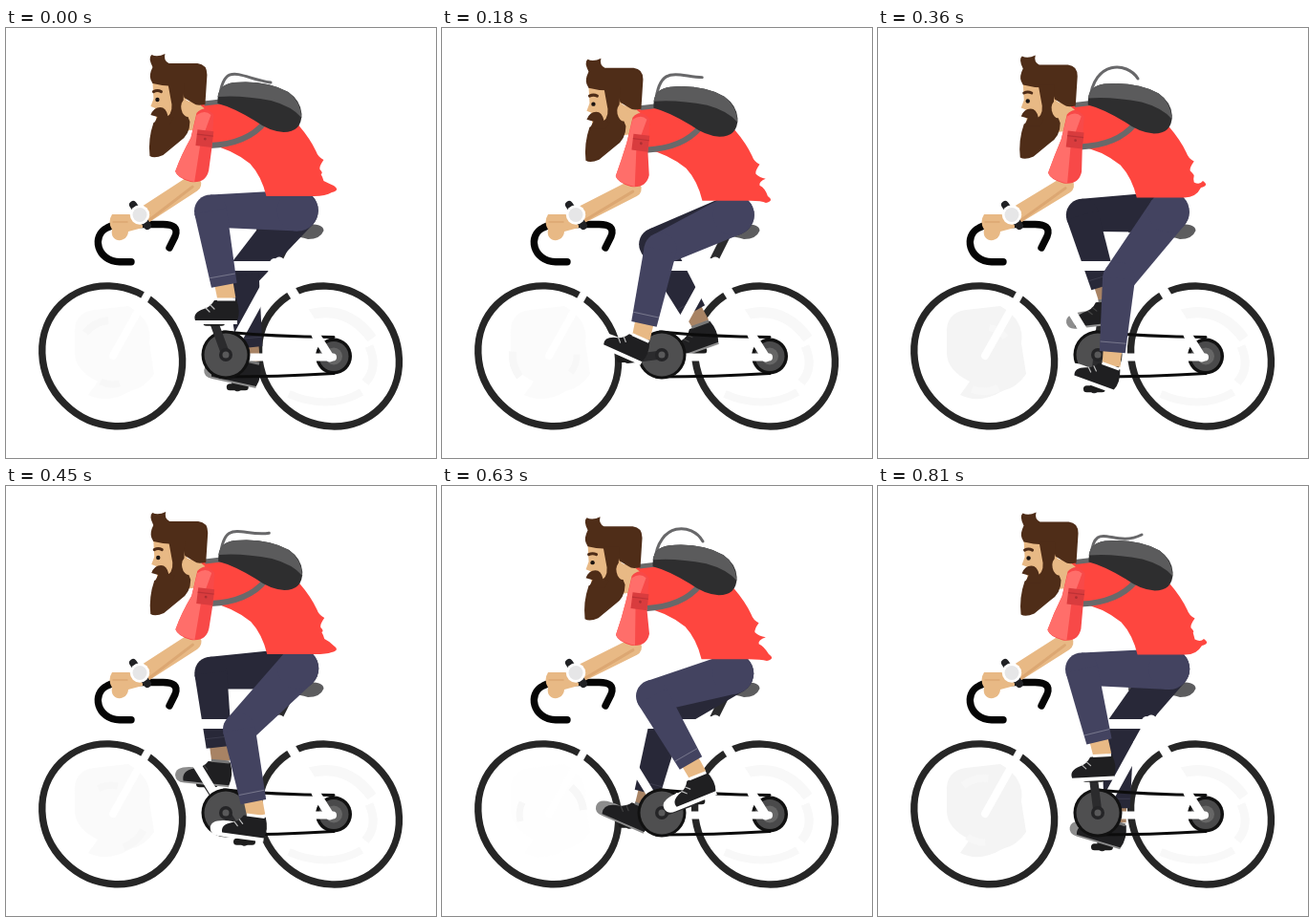
An HTML page with a canvas for the animation above (0.84 s loop, 450 by 450 pixels).

```html
<!DOCTYPE html>
<html lang="en">
<head>
<meta charset="utf-8">
<title>Cyclist</title>
<style>
html, body { margin: 0; width: 100%; height: 100%; overflow: hidden; background: #fff; }
canvas { display: block; width: 450px; height: 450px; }
</style>
</head>
<body>
<canvas id="stage" width="450" height="450"></canvas>
<script>
const ctx = document.getElementById('stage').getContext('2d');
const LOOP = 840, STEP = 30, TAU = Math.PI * 2;
const SKIN = '#e8b985', BROWN = '#4f2d18', RED = '#fe463f', WHITE = '#fff';
const HUB = [230, 342], AXLE = [343, 343.5];

// time, knee x y, ankle x y, foot angle in degrees
const LEG = [
  [0, 214, 191.5, 231, 284, 0],
  [120, 217, 212, 208, 304, 22],
  [240, 241, 250, 215, 344, 23],
  [360, 252, 262, 244, 354, 20],
  [510, 236, 246, 270, 335, -2],
  [630, 220, 220, 268, 303, -22],
  [810, 213, 191.5, 235, 282, -3]
];
// time, shirt tail x y, strap tip x y, strap bend y, wheel haze
const CLOTH = [
  [0, 347, 169, 277, 57, 53, .4],
  [120, 349, 177, 271, 52, 34, .08],
  [240, 341, 180, 274, 52, 66, .8],
  [360, 344, 164, 272, 53, 35, 1],
  [510, 348, 177, 277, 48, 64, .05],
  [630, 346, 180, 273, 58, 38, .12],
  [810, 345, 164, 276, 51, 66, 1]
];

// smooth periodic curve through the rows of a table
function sample(rows, t) {
  t = ((t % LOOP) + LOOP) % LOOP;
  const n = rows.length;
  const at = k => rows[(k + n) % n];
  const time = k => at(k)[0] + Math.floor(k / n) * LOOP;
  let i = n - 1;
  while (rows[i][0] > t) i--;
  const [ta, tb, tc, td] = [-1, 0, 1, 2].map(k => time(i + k));
  const span = tc - tb, u = (t - tb) / span;
  return at(i).slice(1).map((b, j) => {
    const a = at(i - 1)[j + 1], c = at(i + 1)[j + 1], d = at(i + 2)[j + 1];
    const m = (c - a) / (tc - ta) * span, k = (d - b) / (td - tb) * span;
    return b + u * (m + u * (3 * (c - b) - 2 * m - k + u * (2 * (b - c) + m + k)));
  });
}

function shape(d, color) {
  ctx.fillStyle = color;
  ctx.fill(new Path2D(d));
}
function line(d, color, width, cap = 'round') {
  ctx.strokeStyle = color;
  ctx.lineWidth = width;
  ctx.lineCap = cap;
  ctx.lineJoin = 'round';
  ctx.stroke(new Path2D(d));
}
function disc(x, y, r, color) {
  ctx.fillStyle = color;
  ctx.beginPath();
  ctx.arc(x, y, r, 0, TAU);
  ctx.fill();
}
function within(x, y, angle, draw) {
  ctx.save();
  ctx.translate(x, y);
  ctx.rotate(angle);
  draw();
  ctx.restore();
}
// tapered band from a to b, half widths ra and rb
function limb(a, ra, b, rb, color) {
  const dx = b[0] - a[0], dy = b[1] - a[1], len = Math.hypot(dx, dy);
  const nx = -dy / len, ny = dx / len;
  ctx.fillStyle = color;
  ctx.beginPath();
  ctx.moveTo(a[0] + nx * ra, a[1] + ny * ra);
  ctx.lineTo(b[0] + nx * rb, b[1] + ny * rb);
  ctx.lineTo(b[0] - nx * rb, b[1] - ny * rb);
  ctx.lineTo(a[0] - nx * ra, a[1] - ny * ra);
  ctx.fill();
}
const mix = (a, b, u) => [a[0] + (b[0] - a[0]) * u, a[1] + (b[1] - a[1]) * u];

function drawHaze(amount, t) {
  ctx.globalAlpha = amount;
  shape('M72 322Q70 298 92 295L128 291Q154 306 150 330L155 362Q146 376 130 380Q106 394 86 384L96 370Q72 358 72 340Z', '#f4f4f4');
  ctx.globalAlpha = 1;
  within(111, 343, -t / LOOP * TAU, () => {
    line('M-28 -24A37 37 0 0 1 -4 -37', '#f7f7f7', 8, 'butt');
    line('M8 29A30 30 0 0 1 -12 27', '#f7f7f7', 7, 'butt');
  });
  within(338, 343, 0, () => {
    line('M-24 -42Q18 -55 45 -18', '#f8f8f8', 11, 'butt');
    line('M-42 40Q0 58 34 38', '#f8f8f8', 8, 'butt');
    line('M42 -10Q52 12 38 28', '#f8f8f8', 9, 'butt');
  });
}

// the wheels lean into a slight diagonal oval
function drawWheel(x, y) {
  ctx.strokeStyle = '#262626';
  ctx.lineWidth = 7.4;
  ctx.beginPath();
  ctx.ellipse(x, y, 76.2, 70.6, TAU / 8, 0, TAU);
  ctx.stroke();
}

function drawCrank(angle, color) {
  const x = HUB[0] - 36 * Math.sin(angle), y = HUB[1] - 36 * Math.cos(angle);
  line(`M${HUB}L${x} ${y}`, color, 9);
  line(`M${x - 8} ${y}h16`, '#1c1c1c', 7);
}

function drawLeg(t, hip, far) {
  const [kx, ky, ax, ay, deg] = sample(LEG, t);
  const knee = [kx, ky], ankle = [ax, ay];
  const cloth = far ? '#282838' : '#434360';
  const len = Math.hypot(ax - kx, ay - ky);
  const hem = mix(knee, ankle, 1 - 15 / len);
  limb(mix(knee, ankle, .7), 10, ankle, 9.5, far ? '#a88364' : SKIN);
  within(ax, ay, deg * Math.PI / 180, () => {
    shape('M-22 9Q-47 8 -46 19Q-45 26 -36 26H11V20Z', far ? '#8d8d8d' : WHITE);
    shape(far
      ? 'M-13 1L10 0Q15 13 11 24H-37Q-40 14 -27 10Q-17 8 -13 1Z'
      : 'M-13 1L10 0Q15 13 11 22H-33Q-36 14 -24 10Q-17 8 -13 1Z', '#1f1f21');
    line('M-22 9l4 4M-17 6l4 4', far ? '#444' : '#bbb', 1.2);
    line('M-10 0H9', far ? '#777' : WHITE, 3, 'butt');
  });
  limb(hip, 21.5, knee, 17, cloth);
  disc(hip[0], hip[1], 21.5, cloth);
  disc(kx, ky, 17, cloth);
  limb(knee, 17, hem, 13.5, cloth);
  const cuff = mix(knee, ankle, 1 - 25 / len);
  within(cuff[0], cuff[1], Math.atan2(ay - ky, ax - kx) - Math.PI / 2,
    () => line('M-13.5 0H13.5', far ? '#3b3b4c' : '#77778c', 1, 'butt'));
}

function drawSeat() {
  line('M299 214L284 244', '#2b2b2d', 9, 'butt');
  shape('M262 209Q290 210 308 206Q332 203 332.5 212Q329 221 316 221Q300 216 262 214Z', '#5c5c5e');
}

function drawFrame() {
  line('M172 236L112 343', WHITE, 8);
  line('M168 249H284', WHITE, 10);
  line('M174 250L228 338', WHITE, 9);
  line('M286 245L236 336', WHITE, 11);
  line('M281 246L338 338', WHITE, 10);
}

function drawChain() {
  disc(...AXLE, 19, '#111');
  disc(...AXLE, 15.5, '#4a4a4b');
  disc(...AXLE, 9, '#666');
  line('M228 318Q280 323 343 323.5', '#0c0c0c', 3);
  line('M224 365Q285 365 343 361.5', '#0c0c0c', 3);
  line('M250 344.5H342', WHITE, 8);
  line('M324 321L339 345', WHITE, 9);
  disc(...HUB, 25.5, '#111');
  disc(...HUB, 22.5, '#4f4f50');
}

function drawBar() {
  line('M131 244.8H119C95 244 89 217 106 209Q112 205.5 122 205.5H163Q182 205 177 218L171 230', '#050505', 7.4);
  line('M172 239L166 248', WHITE, 10);
}

function drawPack([, , tipX, tipY, bend], dx, dy) {
  const x = tipX - dx, y = tipY - dy;
  line(`M223 74C227 32 ${bend > 50 ? 246 : 262} ${bend - dy} ${x} ${y}`, '#68686a', 3);
  shape('M221 76Q221 59 238 57Q272 54 295 67Q308 76 309 90Q309 109 290 109Q275 108 260 97Q237 83 221 79Z', '#2e2e2f');
  shape('M221 72Q223 59 238 57Q272 54 295 67Q308 77 309 94Q299 82 277 76Q246 70 221 72Z', '#5b5b5c');
}

function drawShirt([tailX, tailY], dx, dy) {
  const x = tailX - dx, y = tailY - dy, flap = 329 + dy * 2;
  shape(`M194 84L212 77Q240 80 262 92L306 102Q318 116 324 129Q326 135 332 138Q327 145 328 148Q332 152 ${flap} 153Q331 156 332 160Q338 163 ${x - 4} ${y - 4}Q${x + 3} ${y + 1} ${x - 6} ${y + 3}Q334 176 322 176L272 176Q267 155 255 142Q235 126 211 122Z`, RED);
  line('M207 79L224 77', '#69696a', 5, 'butt');
  line('M270 99Q252 121 213 123', '#69696a', 6, 'butt');
}

function drawHead() {
  shape('M182 78L197 76L207 84L202 106L184 108Z', SKIN);
  shape('M153 56H188V98H157L156 84L151 82L154 74Z', SKIN);
  shape('M151 54Q149 49 153 41Q148 31 152 28Q158 31 166 27Q164 34 170 37H200Q210 38 210 49L208 80Q199 82 196 79L186 73L183 60Q168 62 153 58Z', BROWN);
  shape('M169 58H186L185 80L192 98Q192 112 181 119L164 133Q155 137 150 134Q148 116 154 99L164 95Q174 92 173 80Z', BROWN);
  shape('M151 91Q154 83 161 83Q167 83 169 92L175 94L171 101L154 101L158 93Z', BROWN);
  ctx.fillStyle = SKIN;
  ctx.beginPath();
  ctx.ellipse(188.5, 84, 5.5, 9, -.2, 0, TAU);
  ctx.fill();
  line('M154 66.5Q158 64.5 162 66.5', BROWN, 3);
  disc(158, 75, 2.2, '#1c1411');
}

function drawArm(dx, dy) {
  const ex = 193 + dy + dx * .3, ey = 151 + dy * 1.1;
  const sx = 208 + dx, sy = 91 + dy;
  line(`M${ex + 2} ${ey + 12}L143 197`, SKIN, 18);
  line(`M${ex + 2} ${ey + 15}L150 201`, '#dca772', 3);
  shape('M111 195H131Q144 199 143 209L128 213C127 226 108 225 111 211Q106 203 111 195Z', SKIN);
  line('M112 203H127', '#dca772', 1.5);
  line('M133 185L148 207', '#202124', 8);
  disc(140, 195.5, 10.2, WHITE);
  disc(140, 195.5, 7.5, '#e6e6e7');
  const inner = `L${ex - 16} ${ey - 1}Q${ex - 10} ${ey - 18} ${sx - 15} ${sy + 24}Z`;
  shape(`M${sx - 9} ${sy - 2}Q${sx} ${sy - 12} ${sx + 9} ${sy}L${sx + 7} ${sy + 34}L${ex + 19} ${ey - 2}Q${ex + 16} ${ey + 12} ${ex} ${ey + 10}Q${ex - 14} ${ey + 6} ${ex - 16} ${ey - 1}` + inner, '#f84948');
  shape(`M${sx - 9} ${sy}Q${sx} ${sy - 6} ${sx + 6} ${sy}L${sx - 5} ${sy + 30}L${ex + 4} ${ey + 10}Q${ex - 14} ${ey + 6} ${ex - 16} ${ey - 1}` + inner, '#ff6e6a');
  within(sx - 1, sy + 24, .12, () => {
    shape('M-8 -8H9V9H-8Z', '#d93c3e');
    line('M-8 -3H9', '#bd3236', 1.2, 'butt');
    disc(1, 1, 1.4, '#ad2f33');
  });
}

function draw(t) {
  const dy = 2.6 - 2.6 * Math.cos(TAU * (t - 15) / 420);
  const dx = 2 * Math.sin(TAU * (t + 15) / 420);
  const hip = [305 + dx * .6, 191 + dy];
  const turn = TAU * (t / LOOP + 20 / 360);
  const cloth = sample(CLOTH, t);

  ctx.fillStyle = WHITE;
  ctx.fillRect(0, 0, 450, 450);
  drawHaze(Math.min(1, Math.max(0, cloth[5])), t);
  drawWheel(111.2, 343.3);
  drawWheel(338, 343.5);
  drawCrank(turn + Math.PI, '#29292a');
  drawSeat();
  drawLeg(t + LOOP / 2, hip, true);
  drawFrame();
  drawChain();
  drawCrank(turn, '#2b2b2d');
  disc(...HUB, 7, '#252527');
  disc(...HUB, 3.5, '#59595a');
  drawBar();
  drawLeg(t, hip, false);

  ctx.save();
  ctx.translate(dx, dy);
  drawShirt(cloth, dx, dy);
  drawPack(cloth, dx, dy);
  drawHead();
  ctx.restore();
  drawArm(dx, dy);
}

const start = performance.now();
function tick() {
  const t = (performance.now() - start) % LOOP;
  draw(Math.floor(t / STEP) * STEP);
  requestAnimationFrame(tick);
}
tick();
</script>
</body>
</html>
```
